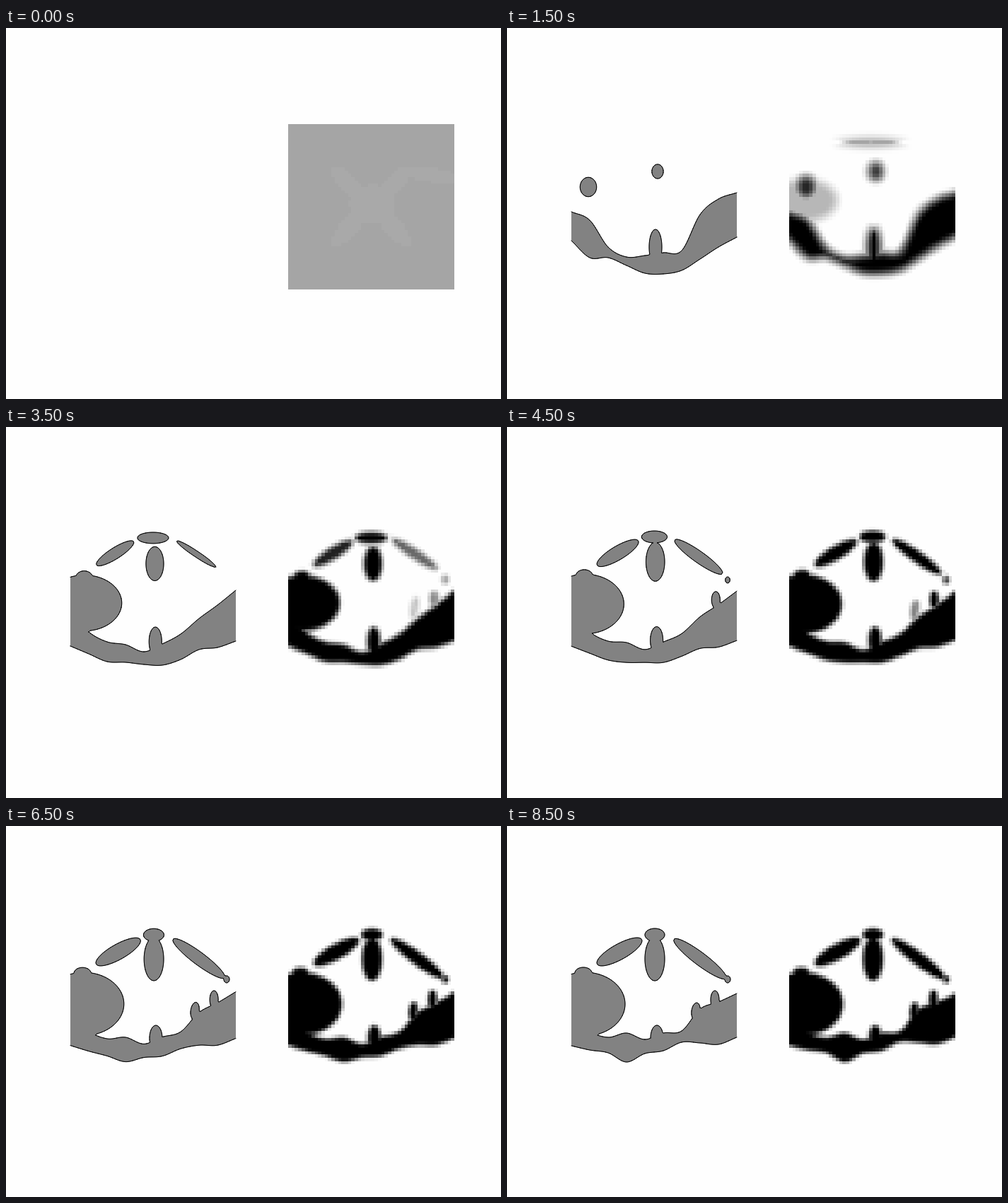
Recreate the animation shown at these times as an HTML page with a canvas. Size 700 px wide and 525 px high, loop 9000 ms.

```html
<!DOCTYPE html>
<html lang="en">
<head>
<meta charset="utf-8">
<title>Density evolution</title>
<style>
  html, body { margin: 0; width: 100%; height: 100%; overflow: hidden; background: #fefefe; }
  canvas { display: block; width: 700px; height: 525px; }
</style>
</head>
<body>
<canvas id="stage" width="700" height="525"></canvas>
<script>
const ctx = document.getElementById('stage').getContext('2d');
const LOOP = 9000, STEP = 500;
const START = 1500, MIDDLE = 3500, END = 8500;
const X0 = 91, Y0 = 136, SIZE = 234;        // contour panel
const RIGHT = 399, RIGHT_WIDTH = 235;       // density panel
const CELLS = 50, H = 2, N = SIZE / H + 1;  // density cells, contour lattice

const lerp = (a, b, t) => a + (b - a) * t;
const clamp = v => Math.max(0, Math.min(1, v));
const mix = (a, b, t) => a.map((v, i) => lerp(v, b[i], t));

// Approximate signed distance to a rotated ellipse, negative inside
function ellipse(x, y, [cx, cy, rx, ry, deg = 0]) {
  const c = Math.cos(deg * Math.PI / 180), s = Math.sin(deg * Math.PI / 180);
  const u = ((x - cx) * c + (y - cy) * s) / rx, v = ((y - cy) * c - (x - cx) * s) / ry;
  const k0 = Math.hypot(u, v), k1 = Math.hypot(u / rx, v / ry);
  return k1 ? k0 * (k0 - 1) / k1 : -Math.min(rx, ry);
}

// Smooth height curve through evenly spaced knots across the panel
function height(knots, x) {
  const last = knots.length - 1, p = (x - X0) / SIZE * last;
  const i = Math.max(0, Math.min(last - 1, Math.floor(p))), t = p - i;
  const b = knots[i], c = knots[i + 1];
  const a = knots[i - 1] ?? 2 * b - c, d = knots[i + 2] ?? 2 * c - b;
  return b + t / 2 * (c - a + t * (2 * a - 5 * b + 4 * c - d + t * (3 * (b - c) + d - a)));
}

// The ground band at START, MIDDLE and END
const groundTop = [
  [260, 272, 310, 324, 322, 318, 315, 264, 242, 233],
  [262, 290, 304, 308, 318, 307, 293, 271, 252, 231],
  [262, 290, 299, 293, 302, 293, 290, 259, 249, 237]];
const groundBottom = [
  [301, 325, 325, 336, 347, 348, 343, 327, 310, 296],
  [310, 321, 332, 333, 336, 337, 329, 315, 312, 303],
  [311, 317, 321, 334, 322, 318, 306, 307, 309, 299]];

function groundAt(rows, time) {
  if (time > MIDDLE) return mix(rows[1], rows[2], (time - MIDDLE) / (END - MIDDLE));
  const u = clamp((time - START) / (MIDDLE - START));
  return mix(rows[0], rows[1], 1 - (1 - u) ** 2);
}

// Ellipses (x, y, rx, ry, degrees) that drift from one place to another while
// their strength rises from `faint` at START to 1 at `solid`
const parts = [
  { name: 'left mass',   faint: .28, solid: 2600, from: [112, 244, 46, 30], to: [110, 252, 57, 45] },
  { name: 'left peak',   faint: .85, solid: 2500, from: [115, 225, 13, 15], to: [108, 208, 12, 8] },
  { name: 'column',      faint: 1,   solid: 2500, from: [210, 310, 9, 25],  to: [212, 300, 9, 18] },
  { name: 'drop',        faint: .8,  solid: 3000, from: [213, 203, 10, 12, 20], to: [209, 188, 14, 31] },
  { name: 'cap',         faint: .35, solid: 2700, from: [206, 162, 36, 6],  to: [209, 154, 14, 9] },
  { name: 'left wing',   faint: 0,   solid: 3800, from: [146, 180, 24, 4, -38], to: [159, 178, 36, 11, -29] },
  { name: 'right wing',  faint: -.6, solid: 4200, from: [262, 165, 20, 4, 28],  to: [273, 188, 46, 9, 37] },
  { name: 'wing tip',    faint: -.4, solid: 5000, from: [312, 214, 5, 7],   to: [312, 217, 4, 5] },
  { name: 'wide spike',  faint: -.6, solid: 4500, from: [301, 239, 6, 7],   to: [294, 246, 6, 13] },
  { name: 'thin spike',  faint: -.3, solid: 6500, from: [272, 244, 5, 20, 15],  to: [267, 262, 6, 12, 8] },
];

// Density as a function of place, for one moment
function densityAt(time) {
  const rest = (1 - (time - START) / (END - START)) ** 3;
  const blur = 10 + 12 * rest ** 2;
  const soft = d => { const s = clamp(.5 - d / blur); return s * s * (3 - 2 * s); };
  const top = groundAt(groundTop, time), bottom = groundAt(groundBottom, time);
  const live = parts.map(p => ({
    shape: mix(p.to, p.from.concat(0).slice(0, p.to.length), rest),
    strength: clamp(lerp(p.faint, 1, (time - START) / (p.solid - START))),
  }));
  const slant = (knots, x) => Math.hypot(1, (height(knots, x + 2) - height(knots, x - 2)) / 4);
  return (x, y) => {
    const ground = Math.max((height(top, x) - y) / slant(top, x), (y - height(bottom, x)) / slant(bottom, x));
    return live.reduce((most, p) =>
      p.strength ? Math.max(most, p.strength * soft(ellipse(x, y, p.shape))) : most, soft(ground));
  };
}

// Opening pattern: a faint cross with a tail to the right
const cross = [[209, 250, 32, 28], [292, 208, 48, 10, 8]];
for (const sx of [-1, 1]) for (const sy of [-1, 1])
  cross.push([208 + 30 * sx, 252 + 29 * sy, 36, 13, 48 * sx * sy]);

function drawContour(density) {
  const field = Array.from({ length: N * N }, (_, k) =>
    .5 - density(X0 + k % N * H, Y0 + Math.floor(k / N) * H));
  const fill = new Path2D(), edge = new Path2D();
  const corners = [[0, 0], [1, 0], [1, 1], [0, 1]];
  for (let j = 0; j < N - 1; j++) for (let i = 0; i < N - 1; i++) {
    const nodes = corners.map(([a, b]) =>
      [X0 + (i + a) * H, Y0 + (j + b) * H, field[(j + b) * N + i + a]]);
    const poly = [], cuts = [];
    nodes.forEach((p, k) => {
      const q = nodes[(k + 1) % 4];
      if (p[2] < 0) poly.push(p);
      if ((p[2] < 0) !== (q[2] < 0)) {
        const cut = mix(p, q, p[2] / (p[2] - q[2]));
        poly.push(cut);
        cuts.push(cut);
      }
    });
    if (!poly.length) continue;
    poly.forEach(([x, y], k) => k ? fill.lineTo(x, y) : fill.moveTo(x, y));
    fill.closePath();
    for (let k = 0; k + 1 < cuts.length; k += 2) {
      edge.moveTo(cuts[k][0], cuts[k][1]);
      edge.lineTo(cuts[k + 1][0], cuts[k + 1][1]);
    }
  }
  ctx.fillStyle = '#828282';
  ctx.fill(fill);
  ctx.strokeStyle = '#000';
  ctx.lineWidth = 1;
  ctx.lineCap = 'round';
  ctx.stroke(edge);
}

function drawCells(grayAt) {
  const size = SIZE / CELLS;
  const left = i => RIGHT + Math.round(i * RIGHT_WIDTH / CELLS);
  const top = j => Y0 + Math.round(j * size);
  for (let j = 0; j < CELLS; j++) for (let i = 0; i < CELLS; i++) {
    const g = Math.round(grayAt(X0 + (i + .5) * size, Y0 + (j + .5) * size));
    ctx.fillStyle = `rgb(${g},${g},${g})`;
    ctx.fillRect(left(i), top(j), left(i + 1) - left(i), top(j + 1) - top(j));
  }
}

function draw(time) {
  ctx.fillStyle = '#fefefe';
  ctx.fillRect(0, 0, 700, 525);
  if (time < 1000) {
    drawCells((x, y) => cross.some(e => ellipse(x, y, e) < 0) ? 169 : 165);
    return;
  }
  const density = densityAt(time);
  drawContour(density);
  drawCells((x, y) => 254 * (1 - density(x, y)));
}

let shown = -1;
function tick() {
  const time = Math.floor(performance.now() % LOOP / STEP) * STEP;
  if (time !== shown) draw(shown = time);
  requestAnimationFrame(tick);
}
tick();
</script>
</body>
</html>
```
